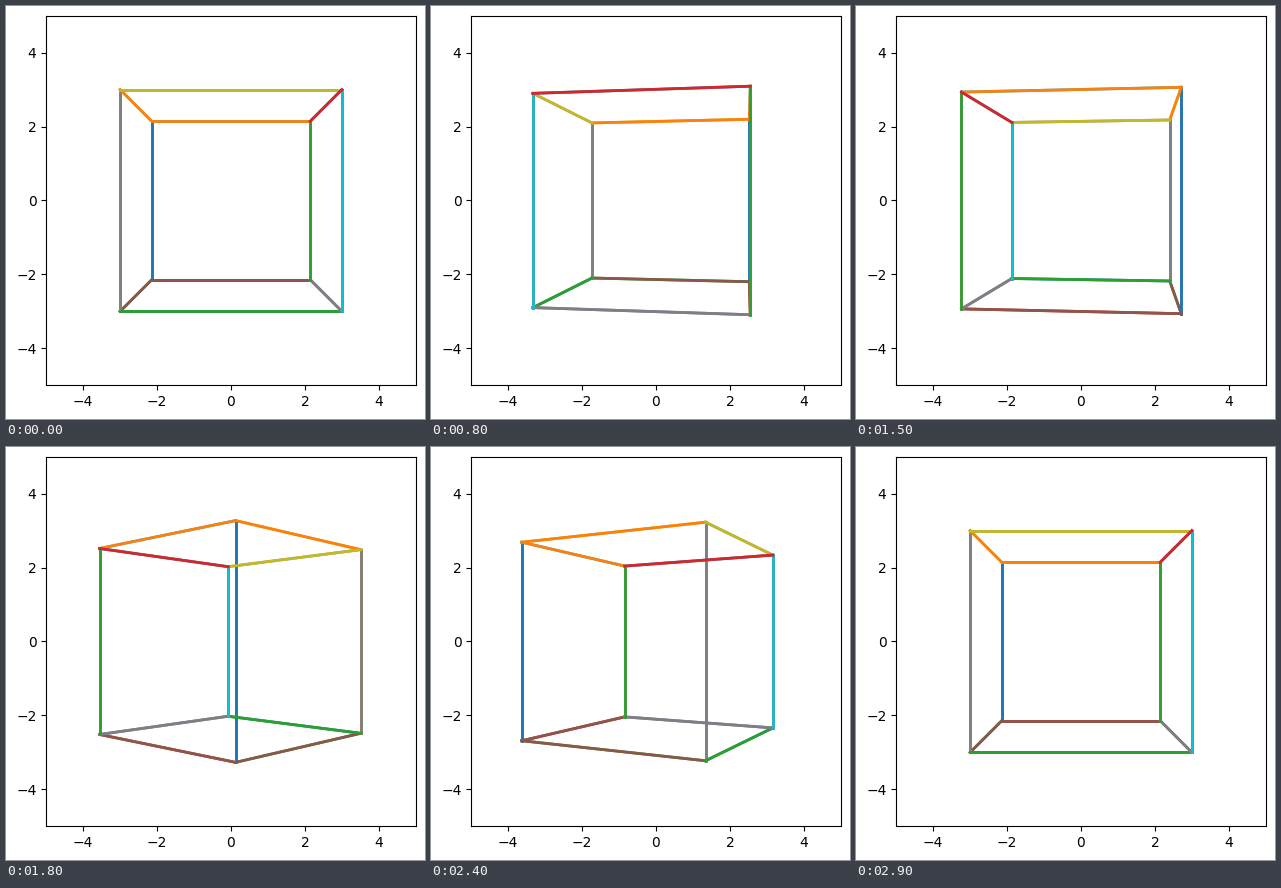
Recreate the animation shown at these times as a matplotlib script. Size 419 px wide and 413 px high, loop 3000 ms.

```python
import numpy as np
import matplotlib.pyplot as plt
from matplotlib.animation import FuncAnimation

W, H, DPI = 419, 413, 100
FRAMES, INTERVAL = 30, 100
SIDE, LEFT, BOTTOM = 369.6, 40.19, 33.72   # axes box in pixels
FOCAL, DISTANCE = 15, 6

# Corner index bits: 4 = right, 2 = top, 1 = far
CORNERS = np.array([(x, y, z) for x in (-1, 1) for y in (-1, 1) for z in (1, -1)])
# Every edge is drawn from both of its ends, so later colours cover earlier ones
EDGES = [(i, i ^ bit) for i in range(8) for bit in (4, 2, 1)]


def project(angle):
    """Turn the cube about its vertical axis and apply perspective."""
    x, y, z = CORNERS.T
    c, s = np.cos(angle), np.sin(angle)
    scale = FOCAL / (DISTANCE - (x * s + z * c))
    return (x * c - z * s) * scale, y * scale


# The tiny margin keeps the pixel size from being truncated down
fig = plt.figure(figsize=(W / DPI + 1e-6, H / DPI + 1e-6), dpi=DPI, facecolor="white")
ax = fig.add_axes([LEFT / W, BOTTOM / H, SIDE / W, SIDE / H])
ax.set(xlim=(-5, 5), ylim=(-5, 5),
       xticks=range(-4, 5, 2), yticks=range(-4, 5, 2))

lines = [ax.plot([], [], color=f"C{k % 10}", lw=2)[0] for k in range(len(EDGES))]


def update(frame):
    # First and last frames show the same pose
    x, y = project(2 * np.pi * frame / (FRAMES - 1))
    for line, (a, b) in zip(lines, EDGES):
        line.set_data([x[a], x[b]], [y[a], y[b]])
    return lines


anim = FuncAnimation(fig, update, frames=FRAMES, interval=INTERVAL,
                     repeat=True, repeat_delay=0, blit=False)
plt.show()
```
